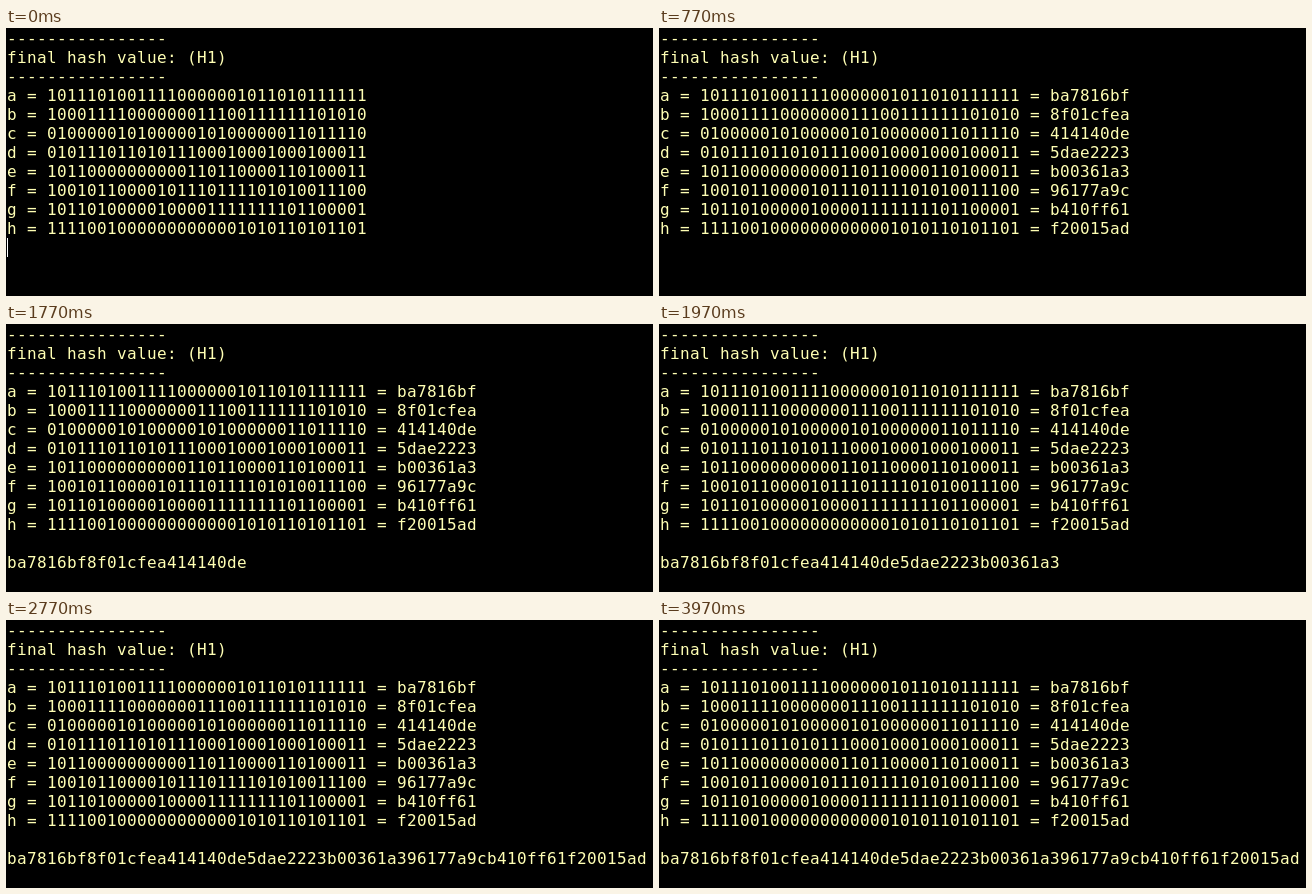
Write an HTML page that moves like this. It is 647 px wide and 268 px high and loops after 4400 ms.

```html
<!DOCTYPE html>
<html lang="en">
<head>
<meta charset="utf-8">
<title>Final hash value</title>
<style>
  html, body { margin: 0; width: 100%; height: 100%; overflow: hidden; background: #000; }
  #term {
    position: absolute; left: 0; top: 0; width: 647px; height: 268px;
    overflow: hidden; background: #000; color: #ffffb4;
    font: 16px/19px "DejaVu Sans Mono", monospace;
    letter-spacing: calc(10px - 1ch);
    font-variant-ligatures: none;
  }
  .row { position: absolute; left: 1px; height: 19px; white-space: pre; }
  #cursor { position: absolute; left: 1px; width: 1px; height: 19px; background: #fff; }
</style>
</head>
<body>
<div id="term"><div id="cursor"></div></div>
<script>
const LOOP = 4400;
const ROW = 19, TOP = 1;
const words = ["ba7816bf", "8f01cfea", "414140de", "5dae2223",
               "b00361a3", "96177a9c", "b410ff61", "f20015ad"];

// Time at which each word joins the digest line
const joinAt = [1570, 1670, 1770, 1870, 1970, 2070, 2170, 2300];
const HEX_AT = 770;

// Spans in which the cursor shows: from, to, row
const blinks = [[0, 370, 11], [970, 1570, 11], [2170, 2770, 13], [3370, 3970, 13]];

const term = document.getElementById("term");
const cursor = document.getElementById("cursor");
const rowTop = n => TOP + n * ROW + "px";

function addRow(n, text = "") {
  const el = document.createElement("div");
  el.className = "row";
  el.style.top = rowTop(n);
  el.textContent = text;
  term.append(el);
  return el;
}

const setText = (el, text) => { if (el.textContent !== text) el.textContent = text; };
const toBits = hex => parseInt(hex, 16).toString(2).padStart(32, "0");

const rule = "-".repeat(16);
[rule, "final hash value: (H1)", rule].forEach((text, i) => addRow(i, text));

const registers = words.map((hex, i) => {
  const bits = "abcdefgh"[i] + " = " + toBits(hex);
  return { el: addRow(3 + i, bits), bits, full: bits + " = " + hex };
});
const digest = addRow(12);

function draw(t) {
  for (const r of registers) setText(r.el, t < HEX_AT ? r.bits : r.full);
  setText(digest, words.filter((_, i) => t >= joinAt[i]).join(""));
  const on = blinks.find(([from, to]) => t >= from && t < to);
  cursor.style.visibility = on ? "visible" : "hidden";
  if (on) cursor.style.top = rowTop(on[2]);
}

const start = performance.now();
function tick() {
  draw((performance.now() - start) % LOOP);
  requestAnimationFrame(tick);
}
tick();
</script>
</body>
</html>
```
